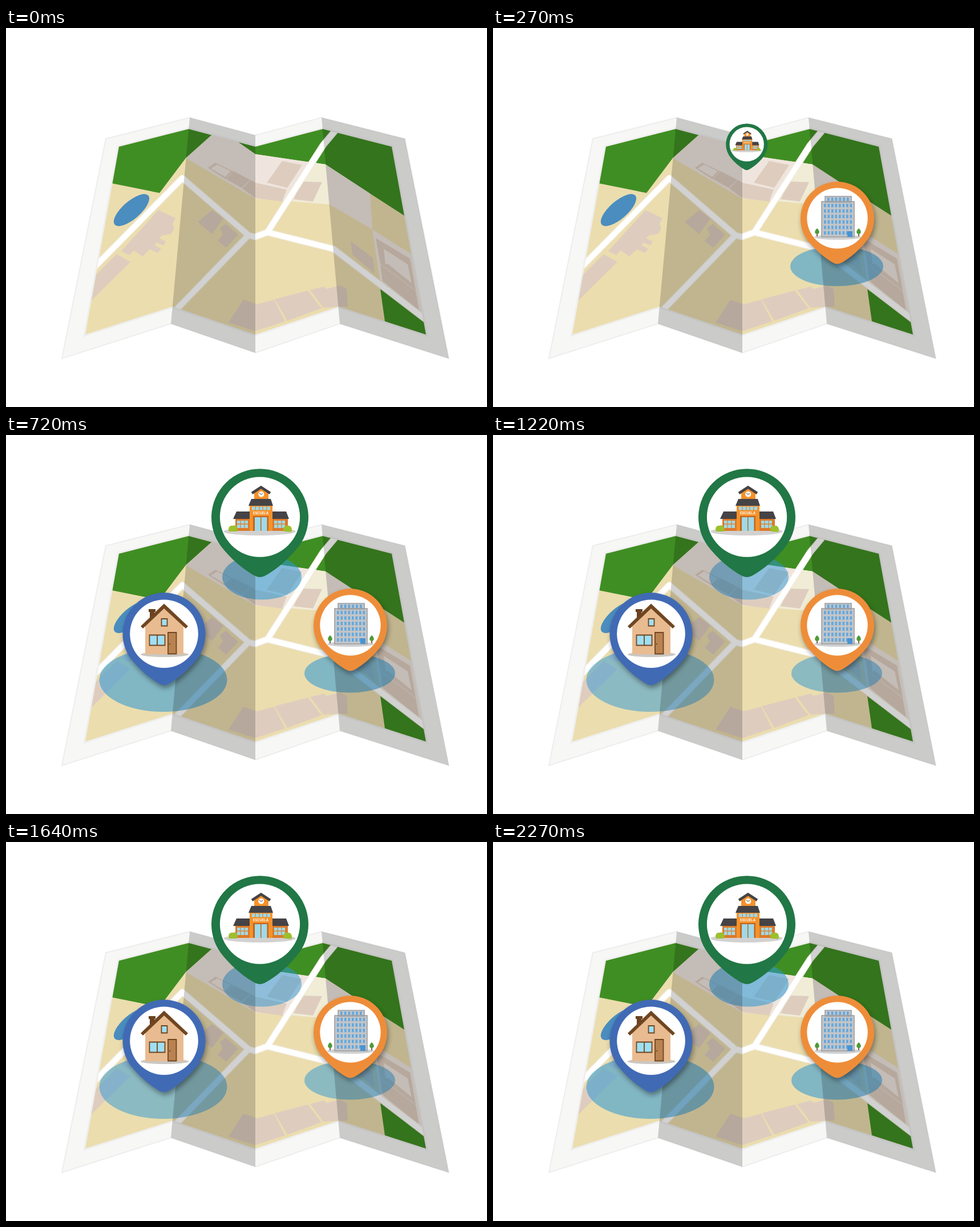
Recreate the animation shown at these times as an HTML page. Size 843 px wide and 664 px high, loop 4.27 s.

```html
<!DOCTYPE html>
<html lang="es">
<head>
<meta charset="utf-8">
<style>
html, body { margin: 0; height: 100%; overflow: hidden; background: #fff; }
svg { display: block; width: 100%; height: 100%; }
.soft { filter: drop-shadow(2px 5px 4px rgba(0,0,0,.38)); }
.ring { fill: #2a97d6; fill-opacity: .55; }
.green { fill: #3f8e23; }
.pale { fill: #efe5de; }
.block { fill: #decdbe; }
.roads { fill: none; stroke-linejoin: round; }
.glass { fill: #9fd9e8; }
</style>
</head>
<body>
<svg viewBox="0 0 843 664">
  <defs>
    <clipPath id="inside"><path id="area" d="M198 208 320 177 437 208 555 177 676 208 736 537 583 488 437 537 292 488 139 537Z"/></clipPath>
    <path id="road" d="M582 174 556 205 458 358 574 387 740 514M458 358 436 366 425 363 309 263 155 419M425 363 296 496"/>
    <g id="marker">
      <path d="M-74 67A100 100 0 1 1 74 67C50 95 26 112 9 121Q0 125-9 121C-26 112-50 95-74 67Z"/>
      <circle cy="-1" r="82.500" fill="#fff"/>
    </g>
  </defs>

  <!-- Folded map -->
  <path d="M175 194 322 157 437 188 553 157 699 194 776 579 585 518 437 569 289 518 98 579Z" fill="#f7f8f6" stroke="#ededed" stroke-width="2"/>
  <use href="#area" fill="#ebddae" stroke="#efefef" stroke-width="6"/>
  <g clip-path="url(#inside)">
    <path fill="#ebddae" d="M130 170H745V545H130Z"/>
    <path class="green" d="M190 200 320 170 370 180 361 187 315 228 269 289 180 271ZM400 195 555 170 680 200 700 330 638 290 560 239 437 221Z"/>
    <path class="pale" d="M361 187 407 200 437 221 560 239 638 290 642 353 567 309 437 299 315 228ZM642 353 712 397 735 517 656 447Z"/>
    <path d="M541 236 560 239 567 309 497 303Z" fill="#f0ecd6"/>
    <path class="green" d="M656 457 733 515 740 540 664 514Z"/>
    <ellipse rx="39" ry="15.500" transform="translate(220 319) rotate(-41)" fill="#4a8dbe"/>
    <g class="block">
      <path d="M267 319 297 333 292 343 295 352 289 361 275 363 268 368 280 374 276 381 264 376 260 380 272 387 266 394 252 388 239 400 224 390 216 398 202 391ZM194 396 218 410 148 479 153 437Z"/>
      <path d="M361 319 381 334 361 361 336 340ZM385 343 407 362 386 385 371 373 380 362 375 351Z"/>
      <path fill-rule="evenodd" d="M367 236 398 251 385 265 354 245ZM370 239 394 251 384 261 359 246ZM399 251 428 266 413 280 386 265ZM429 266 437 271 492 283 484 304 437 298 414 281Z"/>
      <path d="M484 233 519 240 493 280 457 271ZM519 269 554 270 538 304 504 300Z"/>
      <path d="M416 476 440 484 470 476 489 514 437 531 390 516ZM471 475 529 460 553 491 493 513ZM533 459 557 453 562 457 585 451 597 457 599 488 556 490Z"/>
      <path d="M604 373 643 403 646 430 607 397Z"/>
      <path fill-rule="evenodd" d="M648 368 708 404 718 460 656 413ZM662 387 704 414 711 447 669 413 665 414ZM656 414 718 461 724 495 660 443Z"/>
    </g>
    <g class="roads">
      <use href="#road" stroke="#f1ebdc" stroke-width="12"/>
      <use href="#road" stroke="#fff" stroke-width="9.500"/>
    </g>
  </g>

  <g id="rings">
    <ellipse class="ring" cx="602.5" cy="417.5" rx="79.5" ry="34"/>
    <ellipse class="ring" cx="448.5" cy="249" rx="69.5" ry="39.5"/>
    <ellipse class="ring" cx="275.5" cy="429" rx="112" ry="56"/>
  </g>

  <!-- Fold shading covers the map and the rings -->
  <path d="M322 157 437 188V569L289 518ZM553 157 699 194 776 579 585 518Z" fill-opacity=".18"/>

  <g id="pins">
    <!-- Offices -->
    <g class="soft">
      <use href="#marker" transform="translate(603.5 334) scale(.645)" fill="#ee8d39"/>
      <ellipse cx="604" cy="366.500" rx="41" ry="4.500" fill="#d0d0d0"/>
      <path d="M582 295H628V305H582ZM576 304H633V366H576Z" fill="#c3c5c8" stroke="#9b9da0" stroke-width="1.6"/>
      <g id="panes" fill="#62a8de"></g>
      <path d="M621 356H630V366H621Z" fill="#4a94d2"/>
      <path d="M568 356V365M641 356V365" stroke="#5b3b25" stroke-width="1.600"/>
      <path d="M568 351C562 356 564 361 568 361S574 356 568 351ZM641 351C635 356 637 361 641 361S647 356 641 351Z" fill="#4f9a38"/>
    </g>

    <!-- School -->
    <g>
      <use href="#marker" transform="translate(445 144.500) scale(.85)" fill="#217745"/>
      <ellipse cx="444.500" cy="169" rx="63" ry="7" fill="#d3d1d0"/>
      <path d="M402 146H428V168H402ZM467 146H494V168H467Z" fill="#dc7a2a"/>
      <path d="M427 122H467V168H427ZM435 112V99L447 91 460 99V112Z" fill="#f5922a"/>
      <path d="M404 134H427V147H398ZM467 134H491L496 147H467ZM430 112H464L468 124H425Z" fill="#454346"/>
      <path d="M431 102 447 91.500 463 102" fill="none" stroke="#454346" stroke-width="4.500"/>
      <path class="glass" d="M431 125.500H463V131.500H431ZM405 150H424V163H405ZM470 150H489V163H470Z"/>
      <path d="M437 125V132M444 125V132M450 125V132M457 125V132M411 150V163M418 150V163M476 150V163M483 150V163M405 156H424M470 156H489" stroke="#e0842f" stroke-width="1.300"/>
      <path d="M433 142H460V168H433Z" fill="#c0651f"/>
      <path class="glass" d="M436 144H446V168H436ZM447.500 144H457.500V168H447.500Z"/>
      <circle cx="447.300" cy="103.700" r="5" fill="#fff"/>
      <path d="M444 102 447 104 450 102.500" fill="none" stroke="#444" stroke-width="1"/>
      <text x="446.500" y="139.300" text-anchor="middle" fill="#fff" font-family="Inter, Arial, sans-serif" font-weight="700" font-size="5.800">ESCUELA</text>
      <path d="M391 169C388 162 393 158 397 159 403 156 408 163 405 169ZM487 169C484 162 489 158 493 159 499 157 503 164 500 170Z" fill="#9dbf2e"/>
    </g>

    <!-- House -->
    <g class="soft">
      <use href="#marker" transform="translate(277 349) scale(.725)" fill="#416ab5"/>
      <ellipse cx="278" cy="384.500" rx="42" ry="4.500" fill="#cbc7c2"/>
      <path d="M252 308H260V324H252ZM250 305H262V310H250Z" fill="#6b4220"/>
      <path d="M244 333 277 301 311 333V384H244Z" fill="#e9bb91"/>
      <path d="M236 335 277 295.500 319 335 315 339 277 304 240 339Z" fill="#704621"/>
      <g stroke="#704621" stroke-width="1.800">
        <path d="M272.500 322H282.500V334.500H272.500ZM251.500 350.500H278.500V368.500H251.500Z" fill="#9fdff4"/>
        <path d="M265 350V369"/>
        <path d="M284 346H298.500V383.500H284Z" fill="#b98251"/>
      </g>
      <circle cx="287" cy="366" r="1" fill="#4d2f18"/>
    </g>
  </g>
</svg>
<script>
const $ = id => document.getElementById(id);
const pins = [...$('pins').children], rings = [...$('rings').children];
const tips = [[603.5, 413], [444.5, 249], [277, 438]];
const pinScale = [.2, .43, .7, .94, 1.08, 1.04, 1];
const ringScale = [.25, .6, .9, 1.05, 1.025, 1];

let panes = '';
const addPane = (x, y) => panes += `<rect x="${x}" y="${y}" width="3.6" height="6"/>`;
for (let c = 0; c < 6; c++) addPane(586 + c * 6.8, 297);
for (let r = 0; r < 6; r++)
  for (let c = 0; c < 8; c++) addPane(580 + c * 6.5, 308 + r * 9.6);
$('panes').innerHTML = panes;

// Steps before the start give 0; the last value holds.
const at = (list, n) => n < 0 ? 0 : list[Math.min(n, list.length - 1)];

function scaleAbout(el, x, y, s) {
  el.setAttribute('visibility', s ? 'visible' : 'hidden');
  el.setAttribute('transform', `translate(${x} ${y}) scale(${s}) translate(${-x} ${-y})`);
}

// Two soft pulses of eight steps each.
function pulse(t) {
  const step = Math.floor((t - 1150) / 70);
  return step < 1 || step > 16 ? 1 : 1 - .35 * (1 - Math.cos(step * Math.PI / 4));
}

let start;
function draw(now) {
  start ??= now;
  const t = (now - start) % 4270;
  pins.forEach((pin, i) => {
    const n = Math.floor((t - 30 - i * 210) / 30);
    scaleAbout(pin, ...tips[i], at(pinScale, n));
    const ring = rings[i];
    scaleAbout(ring, +ring.getAttribute('cx'), +ring.getAttribute('cy'), at(ringScale, n - 4));
  });
  $('rings').setAttribute('opacity', pulse(t));
  requestAnimationFrame(draw);
}
draw(performance.now());
</script>
</body>
</html>
```
